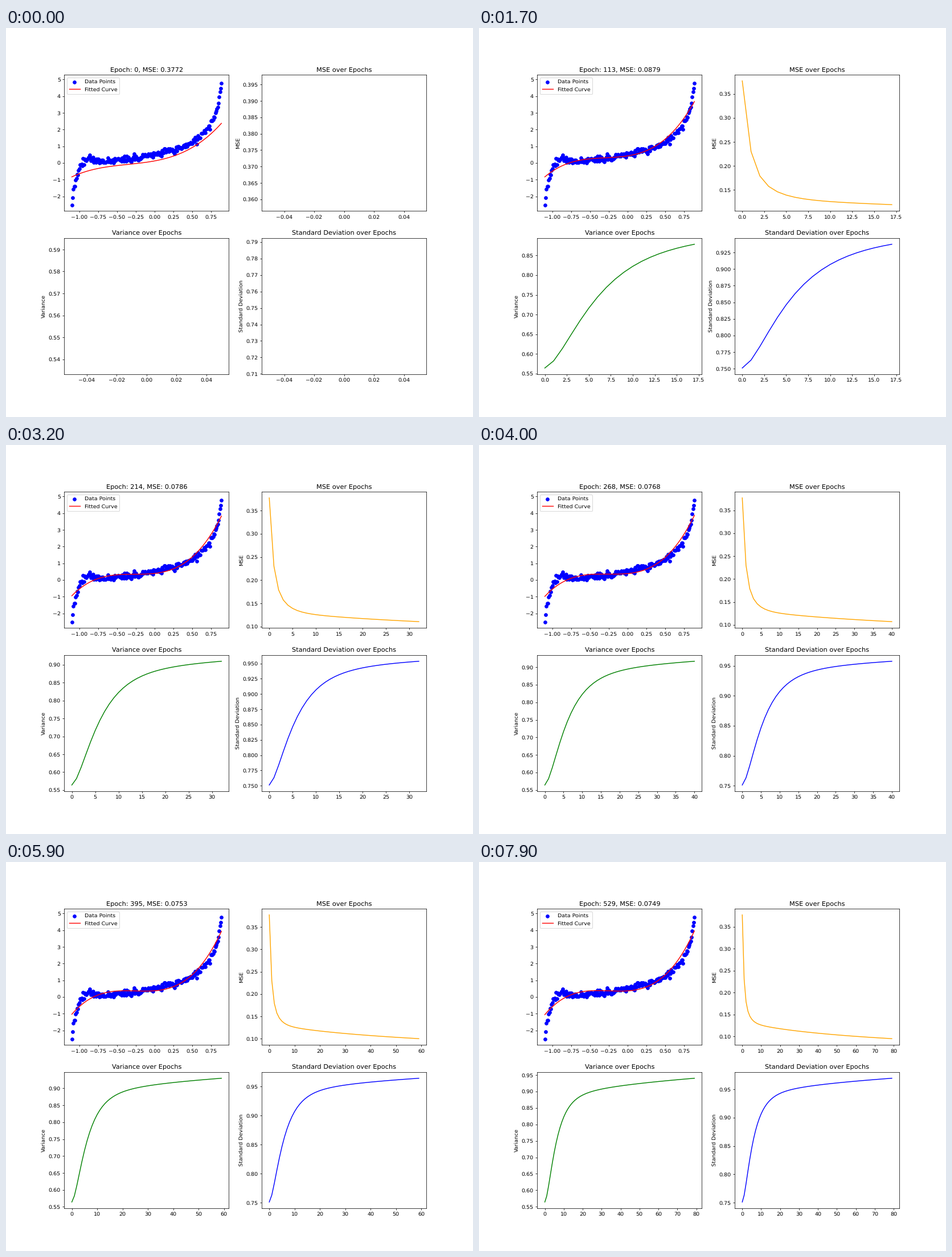
Write a matplotlib script that moves like this. It is 820 by 683 pixels and loops after 8000 ms.

```python
import numpy as np
import matplotlib.pyplot as plt
from matplotlib.animation import FuncAnimation
from numpy.polynomial.legendre import legval

FRAMES, INTERVAL = 80, 100
DPI = 820 / 12
EPOCHS = np.linspace(0, 999, 150, dtype=int)[:FRAMES]

plt.rcParams["text.hinting"] = "none"


def make_data():
    """Noisy samples of a gentle slope with steep ends."""
    x = -1.1 + 0.01 * np.arange(200)
    slope = 0.48 + 0.8 * x + 0.33 * x**2
    rise = 1.42 * np.exp(5.5 * (x - 0.8)) + np.exp(25 * (x - 0.89))
    bump = 0.33 * np.exp(-((x + 0.88) / 0.1)**2)
    drop = 2.45 * np.exp(-17 * (x + 1.1))
    noise = np.random.default_rng(4).normal(0, 0.1, x.size)
    return x, slope + rise + bump - drop + noise


def descend(x, start, goal, rate, steps):
    """Gradient descent of a cubic; returns the curve at every step."""
    basis = np.vander(x, 4)
    u = np.interp(x, (x[0], x[-1]), (-1, 1))
    target = legval(u, goal)
    w = np.polyfit(x, legval(u, start), 3)
    curves = []
    for _ in range(steps):
        curves.append(basis @ w)
        w = w - rate * basis.T @ (curves[-1] - target) / len(x)
    return curves


def decay(n, limit, *modes):
    """A limit plus (amplitude, ratio per epoch) decaying modes."""
    return limit + sum(amp * ratio**n for amp, ratio in modes)


def mse(n):
    return decay(n, 0.07484, (0.0519, np.exp(-1 / 81.8)), (0.008, 0.927),
                 (0.0845, 0.65), (0.158, 0.263))


def variance(n):
    return decay(n, 1.0175, (-0.125, np.exp(-1 / 164)), (-0.047, 0.93),
                 (-0.4564, 0.81), (0.1751, 0.585))


steps = np.arange(FRAMES)
x, y = make_data()
curves = descend(x, start=(0.285, 1.22, 0.485, 0.385),
                 goal=(0.715, 1.5, 0.735, 1.03),
                 rate=0.4, steps=EPOCHS[-1] + 1)

fig, axes = plt.subplots(2, 2, dpi=DPI,
                         figsize=((820 + 1e-6) / DPI, (683 + 1e-6) / DPI))
fig.subplots_adjust(left=0.12495)
fit_ax, *history_axes = axes.flat

fit_ax.scatter(x, y, color="blue", label="Data Points")
fit_line, = fit_ax.plot(x, curves[0], color="red", label="Fitted Curve")
fit_ax.set_xmargin(0.05)
fit_ax.set_ylim(-2.871, 5.291)
fit_ax.legend(loc="upper left")


def history(ax, name, color, values):
    ax.set_title(f"{name} over Epochs")
    ax.set_ylabel(name)
    line, = ax.plot([], [], color=color)
    return ax, line, values


spread = variance(steps)
histories = [
    history(history_axes[0], "MSE", "orange", mse(steps)),
    history(history_axes[1], "Variance", "green", spread),
    history(history_axes[2], "Standard Deviation", "blue", np.sqrt(spread)),
]


def update(i):
    epoch = EPOCHS[i]
    fit_line.set_ydata(curves[epoch])
    fit_ax.set_title(f"Epoch: {epoch}, MSE: {mse(epoch):.4f}")
    for ax, line, values in histories:
        line.set_data(steps[:i + 1], values[:i + 1])
        ax.relim()
        ax.autoscale_view()


anim = FuncAnimation(fig, update, frames=FRAMES, interval=INTERVAL,
                     repeat=True, repeat_delay=0, blit=False)
plt.show()
```
